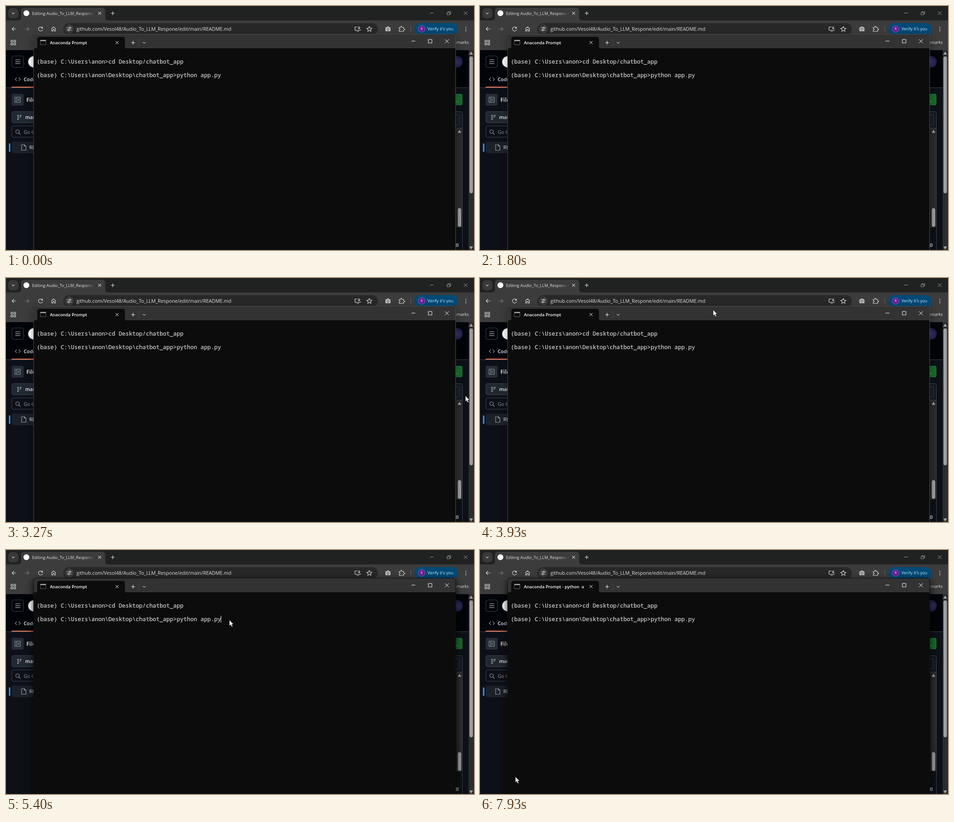
An HTML page for the animation above (8000 ms loop, 1033 by 542 pixels).

```html
<!DOCTYPE html>
<html lang="en">
<head>
<meta charset="utf-8">
<title>Prompt over browser</title>
<style>
  html, body { margin: 0; width: 100%; height: 100%; overflow: hidden; background: #0d1117; }
  #stage { display: block; width: 100vw; height: 100vh; }
  text { font-family: "Open Sans", "Noto Sans", sans-serif; white-space: pre; }
  .mono { font: 12.55px "Noto Sans Mono", "DejaVu Sans Mono", monospace; fill: #d6d6d6; stroke: #d6d6d6; stroke-width: .2; }
  .small { font-size: 9.2px; fill: #e3e3e3; }
  .page { font-size: 10.8px; fill: #f0f6fc; }
  .bold { font-weight: 600; }
  .line { fill: none; stroke: #d6d6d6; stroke-width: 1.2; }
  .dim { stroke: #9a9a9a; stroke-width: 1; }
  .mute { stroke: #9198a1; }
  .ctl { stroke: #fff; stroke-width: 1; }
  .edge { stroke: #3d444d; stroke-width: 1; }
</style>
</head>
<body>
<svg id="stage" viewBox="0 0 1033 542" preserveAspectRatio="none" xmlns="http://www.w3.org/2000/svg">
  <defs>
    <filter id="blur" x="-10%" y="-10%" width="120%" height="120%"><feGaussianBlur stdDeviation="8"/></filter>
    <linearGradient id="fade"><stop offset="0" stop-color="#3c3c3c" stop-opacity="0"/><stop offset="1" stop-color="#3c3c3c"/></linearGradient>
    <radialGradient id="orb"><stop offset="0" stop-color="#3a3470"/><stop offset="1" stop-color="#211d45"/></radialGradient>
  </defs>

  <!-- browser frame -->
  <rect width="1033" height="99" fill="#202121"/>
  <rect y="32" width="1033" height="66" fill="#3c3c3c"/>
  <path d="M26 32q7 0 7-7V11q0-7 7-7H212q7 0 7 7V25q0 7 7 7Z" fill="#3c3c3c"/>
  <rect x="5" y="5" width="22.500" height="22.500" rx="7" fill="#383838"/>
  <path class="line" d="M13 14.700l3 3 3-3"/>
  <circle cx="45" cy="16" r="6.500" fill="#fff"/>
  <svg x="57" y="4" width="137" height="28">
    <text class="small" x="0.500" y="16.200">Editing Audio_To_LLM_Respone/README</text>
    <rect x="120" width="17" height="28" fill="url(#fade)"/>
  </svg>
  <path class="line" d="M203.700 13.200l6 6m0-6l-6 6M231.500 16.200h8m-4-4v8"/>
  <path class="line dim" d="M936 15.500h8M973.500 14.500h6v5h-6zM975.500 14.500v-2h6v5h-2M1010.500 12l8 8m0-8l-8 8"/>

  <!-- toolbar -->
  <path class="line" d="M22.500 51h-9m4-4l-4 4 4 4"/>
  <path class="line" style="stroke:#777" d="M41.500 51h9m-4-4l4 4-4 4"/>
  <path class="line" d="M80 48.800a4.500 4.500 0 1 0 .5 3.500M80.500 46v3.300h-3.300"/>
  <path class="line" d="M100.800 50l4.200-3.700 4.200 3.700v5.700h-2.700v-3.500h-3v3.500h-2.700z"/>
  <rect x="126.500" y="38" width="694.500" height="26" rx="13" fill="#282828"/>
  <circle cx="139.700" cy="51" r="10" fill="#3c3c3c"/>
  <path class="line" d="M134.800 48.500h4m4 0h2M134.800 53.500h2m4 0h4"/>
  <circle class="line" cx="141" cy="48.500" r="1.600"/><circle class="line" cx="138.500" cy="53.500" r="1.600"/>
  <text x="155.500" y="54.600" font-size="10.760" fill="#e3e3e3">github.com/Vesol48/Audio_To_LLM_Respone/edit/main/README.md</text>
  <path class="line" d="M776 46.500h-5.500v7.500h11.500v-2M774 56h5M779.500 45v5.500m-2.500-2.300l2.500 2.500 2.500-2.500"/>
  <path class="line" d="M802 45.500l1.700 3.700 4 .4-3 2.700.9 4-3.600-2.100-3.600 2.100.9-4-3-2.700 4-.4z"/>
  <path d="M837.500 47.500h2.500l1.300-1.800h3.400l1.300 1.800h2.500v8.500h-11z" fill="#c4c4c4"/>
  <circle cx="843" cy="51.500" r="2.400" fill="#c4c4c4" stroke="#3c3c3c"/>
  <path class="line" d="M868 47.500h3q0-2.500 1.600-2.500t1.600 2.500h3.300v3q2.500 0 2.500 1.500t-2.500 1.500v3h-9.500v-3q2 0 2-1.700t-2-1.700z"/>
  <path d="M893.500 45v12" stroke="#636363"/>
  <rect x="902" y="38" width="95.500" height="25.500" rx="12.700" fill="#004a77"/>
  <circle cx="917.500" cy="51" r="7.500" fill="#701c96" stroke="#6f93b8" stroke-width=".7"/>
  <text x="917.500" y="53.300" font-size="6.500" fill="#fff" text-anchor="middle">R</text>
  <text class="small" style="fill:#d3edff;font-weight:500" x="930.500" y="54.300">Verify it's you</text>
  <g fill="#d6d6d6"><circle cx="1015" cy="47" r="1.100"/><circle cx="1015" cy="51" r="1.100"/><circle cx="1015" cy="55" r="1.100"/></g>
  <path class="line" d="M11 76h3.800v3.800h-3.800zM17.500 76h3.800v3.800h-3.800zM11 82.500h3.800v3.800h-3.800zM17.500 82.500h3.800v3.800h-3.800z"/>
  <text class="small" x="1021.500" y="84" text-anchor="end">All Bookmarks</text>

  <!-- page -->
  <rect y="98" width="1033" height="84" fill="#010409"/>
  <rect y="181.500" width="1033" height="361" fill="#0d1117"/>
  <path class="edge" d="M0 181.500h1021"/>
  <rect class="edge" x="13" y="111" width="25.500" height="25.500" rx="4" fill="none"/>
  <path class="line" d="M20.500 119.500h11m-11 4.200h11m-11 4.200h11" style="stroke:#b4bac2"/>
  <circle cx="61.500" cy="124" r="12.500" fill="#fff"/>
  <path class="line mute" d="M23.800 159l-3.500 3.700 3.500 3.700M28.200 159l3.500 3.700-3.500 3.700"/>
  <text class="page bold" x="39" y="167">Code</text>
  <rect x="12.500" y="179.300" width="60" height="2" fill="#f78166"/>
  <rect x="12.500" y="195" width="26.500" height="26.500" rx="4" fill="#252c34"/>
  <path class="line mute" d="M20 202.500h11.500v11.500h-11.500zM24 202.500v11.500M29 206l-2.200 2.200 2.200 2.200"/>
  <text class="page bold" style="font-size:12.300px" x="45" y="213">Files</text>
  <rect class="edge" x="13" y="234.500" width="90" height="25" rx="4" fill="#212830"/>
  <path class="line mute" d="M26.500 245v5M32.300 245v.8q0 1.700-1.700 1.700h-4"/>
  <g class="line mute"><circle cx="26.500" cy="243.500" r="1.400"/><circle cx="26.500" cy="251.300" r="1.400"/><circle cx="32.300" cy="243.500" r="1.400"/></g>
  <text class="page bold" x="42.500" y="251.300">main</text>
  <rect class="edge" x="13" y="266.500" width="90" height="25" rx="4" fill="#0d1117"/>
  <circle class="line mute" cx="25.500" cy="279" r="4"/><path class="line mute" d="M28.500 282l3.500 3.500"/>
  <text class="page" style="fill:#9198a1" x="39" y="283.500">Go to file</text>
  <rect x="13" y="301.500" width="90" height="25.500" rx="4" fill="#1c2128"/>
  <rect x="6.500" y="305" width="3" height="19" rx="1.500" fill="#4493f8"/>
  <path class="line mute" d="M34.500 308h6l3.500 3.500v9h-9.500zM40.500 308v3.500h3.500"/>
  <text class="page" x="51.500" y="318">README.md</text>

  <circle cx="995" cy="124" r="13" fill="url(#orb)"/>
  <rect x="960" y="195" width="47.500" height="25.500" rx="4" fill="#196c2e"/>
  <text class="page" x="989.500" y="212.500" style="fill:#c9d8cc">...</text>
  <path class="edge" d="M960 234.500H1003.500q4 0 4 4V542" fill="none"/>
  <path d="M960 235H1003q4 0 4 4V271h-47z" fill="#151b23"/>
  <path class="edge" d="M960 271.500h47" fill="none"/>
  <rect class="edge" x="960" y="241.500" width="40.500" height="23" rx="4" fill="#151b23"/>
  <rect x="994" y="272" width="13" height="220" fill="#2c2c2c"/>
  <path d="M997 281.500l4-6.500 4 6.500z" fill="#a0a0a0"/>
  <rect x="997.300" y="449" width="7.400" height="41.500" rx="3.700" fill="#9f9f9f"/>
  <rect x="960" y="492" width="47" height="50" fill="#0d1117"/>
  <rect x="990" y="527.500" width="9" height="7.500" rx="1" fill="#858c95"/>
  <path d="M996 529v3.500m-1.500-1.300l1.500 1.500 1.500-1.500" stroke="#0d1117" fill="none"/>

  <rect x="1021" y="98" width="12" height="444" fill="#2c2c2c"/>
  <path d="M1022.500 108l4.200-7 4.200 7zM1022.500 534l4.200 7 4.200-7z" fill="#a0a0a0"/>
  <rect id="thumb" x="1023" y="112" width="7.700" height="304" rx="3.800"/>

  <!-- prompt window -->
  <rect id="shade" x="59" y="66" width="936" height="500" rx="8" filter="url(#blur)"/>
  <rect id="frame" x="61" y="62.500" width="931.500" height="500" rx="6" fill="#0c0c0c"/>
  <path d="M61.500 94V69q0-6 6-6H986q6 0 6 6V94z" fill="#333"/>
  <path d="M65 94q4 0 4-4V74q0-5.500 5.500-5.500H257q5.500 0 5.500 5.500V90q0 4 4 4z" fill="#0c0c0c"/>
  <rect x="76" y="76" width="12" height="10" fill="#0a0a0a" stroke="#8a8a8a" stroke-width=".7"/>
  <rect x="76" y="75.700" width="12" height="2" fill="#c8c8c8"/>
  <svg x="97" y="70" width="132.500" height="22">
    <text id="label" class="bold" y="15" font-size="9.450" fill="#fff"></text>
  </svg>
  <path class="line ctl" d="M242 78l6.500 6.500m0-6.500l-6.500 6.500M276.500 81.500h8m-4-4v8M302 80l3 3 3-3"/>
  <path d="M293.500 72v18" stroke="#4a4a4a"/>
  <path class="line ctl" d="M895 78h8.500M932.300 74.300h7.800v7.800h-7.800zM969 74l8.500 8.500m0-8.500l-8.500 8.500"/>
  <text class="mono" x="68" y="128">(base) C:\Users\anon&gt;cd Desktop/chatbot_app</text>
  <text class="mono" x="68" y="158">(base) C:\Users\anon\Desktop\chatbot_app&gt;python app.py</text>
  <rect id="caret" width="1" height="15" fill="#f2f2f2"/>
  <path id="pointer" d="M0 0V13.200L3 10.500 5.200 15.200 7.500 14.200 5.400 9.600H9.400Z" fill="#fff" stroke="#000" stroke-width=".7"/>
</svg>
<script>
  const LOOP = 8000, STEP = 1000 / 15;
  const el = id => document.getElementById(id);
  const thumb = el('thumb'), shade = el('shade'), frame = el('frame');
  const label = el('label'), caret = el('caret'), pointer = el('pointer');

  // Pointer strokes as [step, x, y]; it rests between strokes.
  const strokes = [
    [[4, 640, 530], [6, 1022, 400], [8, 940, 100], [11, 300, 130], [13, 74, 300], [16, 480, 470],
     [18, 1020, 330], [20, 760, 116], [23, 72, 300], [25, 480, 500], [26, 860, 530], [27, 1040, 545],
     [28, 1026, 500], [29, 1025, 380], [30, 1024, 310], [31, 1017, 275], [32, 1013, 264]],
    [[49, 1014, 261.5], [51, 1024, 380], [53, 820, 520], [56, 228, 380], [58, 380, 96], [61, 820, 110],
     [62, 960, 185], [63, 990, 140], [66, 166, 110], [68, 330, 40], [70, 545.5, 9.5],
     [72, 640, 60], [74, 610, 140], [76, 530, 160], [78, 493, 155.5]],
    [[84, 496, 157], [86, 502, 160]],
    [[103, 470, 147], [106, 320, 250], [108, 236, 340], [111, 197, 388]],
    [[114, 180, 405], [116, 105, 468], [118, 66, 495], [119, 78, 503.5]]
  ];

  function spline(pts, n) {
    const last = pts.length - 1;
    if (n >= pts[last][0]) return pts[last].slice(1);
    let i = 0;
    while (n >= pts[i + 1][0]) i++;
    const a = pts[Math.max(i - 1, 0)], b = pts[i], c = pts[i + 1], d = pts[Math.min(i + 2, last)];
    const span = c[0] - b[0], u = (n - b[0]) / span;
    return [1, 2].map(k => {
      const m0 = (c[k] - a[k]) / (c[0] - a[0]) * span;
      const m1 = (d[k] - b[k]) / (d[0] - b[0]) * span;
      const rise = c[k] - b[k];
      return b[k] + u * (m0 + u * (3 * rise - 2 * m0 - m1 + u * (m0 + m1 - 2 * rise)));
    });
  }

  // The pointer is away at the start and hidden after Enter until it moves.
  function place(n) {
    if (n < 4 || (n >= 93 && n < 103)) return null;
    return spline(strokes.filter(s => s[0][0] <= n).pop(), n);
  }

  function draw(t) {
    const n = Math.floor((t + 5) / STEP);
    const at = place(n);
    pointer.style.display = at ? '' : 'none';
    if (at) pointer.setAttribute('transform', `translate(${at[0]} ${at[1]})`);
    thumb.setAttribute('fill', at && at[0] > 1021 && at[0] < 1033 ? '#c2c2c2' : '#9f9f9f');

    const focus = Math.min(Math.max((n - 78) / 2, 0), 1);
    shade.setAttribute('opacity', 0.3 + 0.4 * focus);
    frame.setAttribute('stroke', focus ? '#101018' : '#4d4d4d');

    label.textContent = 'Anaconda Prompt' + (n >= 94 ? ' - python\u00a0\u00a0app.py' : '');
    const entered = n >= 93;
    caret.setAttribute('x', entered ? 68 : 474);
    caret.setAttribute('y', entered ? 161 : 146);
    const lit = (n >= 81 && n < 89) || (n >= 93 && n < 102) || (n >= 110 && n < 118);
    caret.style.display = lit ? '' : 'none';
  }

  function tick() {
    draw(performance.now() % LOOP);
    requestAnimationFrame(tick);
  }
  tick();
</script>
</body>
</html>
```
